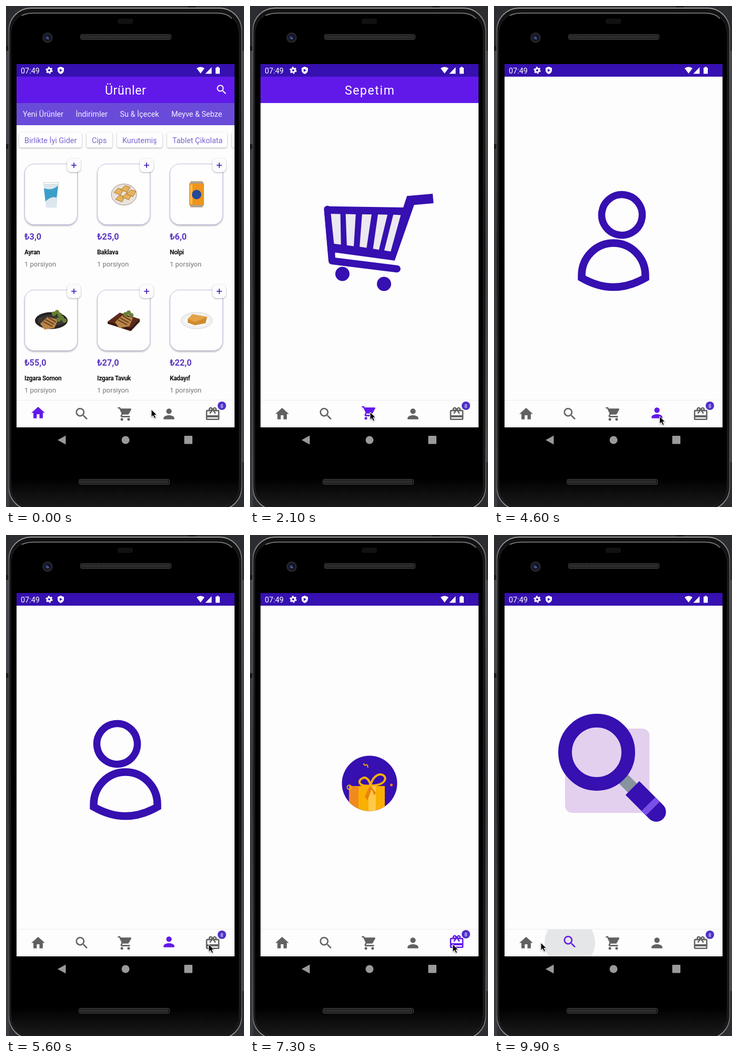
An HTML page for the animation above (10000 ms loop, 452 by 950 pixels).

```html
<!DOCTYPE html>
<html lang="tr">
<head>
<meta charset="utf-8">
<title>Market</title>
<style>
html, body { margin: 0; height: 100%; overflow: hidden; background: #2c2d31; }
svg { display: block; width: 452px; height: 950px; }
text { font-family: Roboto, Arial, sans-serif; font-size: 14.4px; white-space: pre; }
.title { font-size: 23px; fill: #fff; }
.price { font-size: 16.2px; font-weight: 700; fill: #5a35c4; }
.name { font-size: 12px; font-weight: 700; letter-spacing: -.35px; fill: #111; }
.unit { font-size: 13px; fill: #777; }
.soft { filter: drop-shadow(0 1px 1.5px #0005); }
.raised { filter: drop-shadow(0 2px 1.5px #0004); }
.ink { fill: #3610b0; }
.line { fill: none; stroke: #3610b0; }
</style>
</head>
<body>
<svg viewBox="0 0 452 950">
  <defs>
    <linearGradient id="rim" x2="0" y2="1">
      <stop offset="0" stop-color="#9a9a9a"/><stop offset=".05" stop-color="#5c5d60"/>
      <stop offset=".5" stop-color="#2c2d2f"/><stop offset=".95" stop-color="#55565a"/><stop offset="1" stop-color="#999"/>
    </linearGradient>
    <linearGradient id="body" x2="0" y2="1">
      <stop offset=".94" stop-color="#000"/><stop offset="1" stop-color="#1b1b1c"/>
    </linearGradient>
    <clipPath id="screen"><path d="M20 110h414v689H20z"/></clipPath>
    <clipPath id="bar"><path d="M20 748h414v51H20z"/></clipPath>
    <clipPath id="disc"><circle cx="227" cy="471" r="52.5"/></clipPath>
  </defs>

  <!-- Phone -->
  <path fill="#2c2d31" d="M0 0h452v950H0z"/>
  <path fill="#46484d" d="M0 85h6v177H0zM447 85h5v780h-5z"/>
  <path fill="#3a3c40" d="M0 271h6v679H0z"/>
  <path fill="#191a1c" d="M0 262h6v9H0zM0 76h6v9H0zM346 0h14v5h-14z"/>
  <rect x="5.500" y="4" width="442" height="951" rx="42" fill="#121213" stroke="url(#rim)" stroke-width="2"/>
  <rect x="9" y="13" width="434" height="938" rx="38" fill="url(#body)" stroke="#2a2b2d"/>
  <path d="M30 18Q40 13.500 54 13.500H400Q420 13.500 429 24" fill="none" stroke="#858585" stroke-width="1.500"/>
  <rect x="212" y="24" width="29" height="10" rx="4" fill="#111"/>
  <circle cx="79" cy="60" r="10" fill="#242426"/>
  <circle cx="79" cy="60" r="6.500" fill="#101326"/>
  <circle cx="78" cy="60" r="3" fill="#343d78"/>
  <circle cx="80" cy="62" r="1" fill="#aab4ee"/>
  <g fill="#161616" stroke="#4b4b4b">
    <rect x="141.500" y="54" width="172" height="9.500" rx="3"/>
    <rect x="138.500" y="897.500" width="172" height="9.500" rx="3"/>
    <path d="M144 58.700H311M141 902.300H308" stroke-width="6" stroke-dasharray="1 1.500"/>
  </g>
  <g fill="#9a9a9a">
    <path d="M98 823l15.500-8.500v17z"/><circle cx="227" cy="823" r="7.500"/>
    <rect x="338.500" y="815" width="15.500" height="15.500" rx="1"/>
  </g>

  <g clip-path="url(#screen)">
    <path fill="#fdfdfd" d="M20 110h414v689H20z"/>
    <g class="view" id="home"></g>

    <g class="view">
      <path fill="#6119ea" d="M20 134h414v50H20z"/>
      <text class="title" x="180" y="168" letter-spacing="1.6">Sepetim</text>
      <g id="basket">
        <path class="ink" d="M150 372L295 387 304 366H353V384H316L270 486 159 461 152 476 145 473V377Q145 372 150 372z"/>
        <path class="line" d="M151.500 378V476L273 502" stroke-width="13.500" stroke-linecap="round" stroke-linejoin="round"/>
        <path fill="#ebe8f0" d="M157 387l18 2-4 58-13-3zM185 390l19 2-9 60-13-3zM216 393l18 2-15 62-13-3zM246 396l18 2-22 65-11-3zM275 399l14 2-25 67-12-3z"/>
      </g>
      <g class="ink" id="wheels"><circle cx="163.500" cy="511" r="13.500"/><circle cx="242.500" cy="530" r="13.500"/></g>
      <path class="ink" id="sparks" d="M200 324q2-5 7-2l9 35q-3 4-6 1zM229 339q2-4 5-1l-6 17q-2 2-4 0zM252 338q5-3 7 2l-17 20q-4 3-6-1z"/>
    </g>

    <g class="view">
      <circle class="line" id="head" cx="227" cy="395" r="38.500" stroke-width="13.500"/>
      <path class="line" d="M166.500 515.500V511A60.500 61.500 0 0 1 287.500 511V515.500Q227 550.500 166.500 515.500z" stroke-width="14.500"/>
    </g>

    <g class="view">
      <circle class="ink" cx="227" cy="471" r="52.500"/>
      <g clip-path="url(#disc)"><g id="gift">
        <path fill="#f08a1d" d="M188 490h18v55h-18z"/>
        <path fill="#f9b000" d="M206 490h50v55h-50z"/>
        <path fill="#ffc84a" d="M225 490h14v55h-14z"/>
        <path fill="#e8820c" d="M228 488l-10 22 5 7 8-21 5 12 3-5z"/>
        <path fill="none" stroke="#f9b000" stroke-width="4" d="M229 489C206 492 203 480 214 475 222 471 228 482 229 489 232 474 243 465 252 469 262 474 257 489 229 489z"/>
        <g fill="none" stroke="#f9b000" stroke-width="2"><circle cx="188.500" cy="492.500" r="4"/><path d="M216 447q1 5 4 3t4 5"/></g>
        <circle cx="268.500" cy="488" r="2.500" fill="#f08a1d"/>
      </g></g>
      <g id="confetti"></g>
    </g>

    <g class="view">
      <rect x="135" y="367" width="160.500" height="160" rx="14" fill="#e3d0ef"/>
      <g id="lens"><g transform="translate(195 412) rotate(45)">
        <path fill="#87939f" d="M62-12h37v24H62z"/>
        <path class="ink" d="M96-18.500h64a18.500 18.500 0 0 1 0 37H96z"/>
        <path fill="#7a4fe8" d="M139-18.500h12v37h-12z"/>
        <circle r="60" fill="#e3d0ef" stroke="#3610b0" stroke-width="26"/>
      </g></g>
    </g>

    <!-- Status bar -->
    <path class="ink" d="M20 110h414v24H20z"/>
    <g fill="#fff">
      <text x="28" y="127.500" fill="#fff">07:49</text>
      <circle cx="82" cy="122" r="3.600" fill="none" stroke="#fff" stroke-width="3"/>
      <circle cx="82" cy="122" r="5.700" fill="none" stroke="#fff" stroke-width="2" stroke-dasharray="3 2.970"/>
      <path d="M104 115l6 2.500v4c0 3.500-2.500 6.500-6 7.500-3.500-1-6-4-6-7.500v-4z"/>
      <path class="ink" d="M102 119l5 3-5 3z"/>
      <path d="M362 118q7.500-5 15 0l-7.500 10zM378.500 128.500h12V116zM398 117h2v-1.500h4v1.500h2v11.500h-8z"/>
    </g>

    <!-- Navigation -->
    <path fill="#fdfdfd" d="M20 747h414v52H20z"/>
    <path d="M20 747.500h414" stroke="#ececec"/>
    <g clip-path="url(#bar)"><circle class="wave" cy="773" fill="#1c2228"/><circle class="wave" cy="773" fill="#222"/></g>
    <g id="nav"></g>
    <g id="badge">
      <circle cx="410" cy="758" r="8" fill="#5030c8"/>
      <text x="410" y="761.500" text-anchor="middle" fill="#fff" style="font-size:9.500px">8</text>
    </g>
  </g>
  <path class="soft" id="cursor" stroke="#fff" d="M0 0V14.500L3.400 11.500 6 17 8.600 15.800 6 10.500H10.500z"/>
</svg>

<script>
const $ = id => document.getElementById(id);
const all = s => [...document.querySelectorAll(s)];
const clamp = v => Math.min(1, Math.max(0, v));
const smooth = v => (v = clamp(v)) * v * (3 - 2 * v);
const set = (el, attrs) => { for (const k in attrs) el.setAttribute(k, attrs[k]); };
const oval = (rx, ry, style) => `<ellipse rx="${rx}" ry="${ry}" ${style}/>`;
const path = (d, style) => `<path d="${d}" ${style}/>`;
const fill = c => `fill="${c}"`;

// Eased interpolation between rows of [time, value, ...]
function track(t, rows) {
  let i = rows.findIndex(r => r[0] > t);
  if (i < 0) return rows.at(-1).slice(1);
  if (!i) return rows[0].slice(1);
  const a = rows[i - 1], b = rows[i], k = smooth((t - a[0]) / (b[0] - a[0]));
  return a.slice(1).map((v, j) => v + (b[j + 1] - v) * k);
}

const icons = {
  home: "M10 20v-6h4v6h5v-8h3L12 3 2 12h3v8z",
  search: "M15.5 14h-.79l-.28-.27A6.5 6.5 0 1 0 13.730 14.430l.27.28v.79l5 4.990L20.490 19zM9.500 14a4.500 4.500 0 1 1 0-9 4.500 4.500 0 0 1 0 9z",
  cart: "M7 18a2 2 0 1 0 0 4 2 2 0 0 0 0-4zM1 2v2h2l3.600 7.590-1.350 2.450A2 2 0 0 0 7 17h12v-2H7.420a.25.25 0 0 1-.22-.37l.9-1.630h7.450q1.200 0 1.750-1.030l3.580-6.490A1 1 0 0 0 20 4H5.210l-.94-2zM17 18a2 2 0 1 0 0 4 2 2 0 0 0 0-4z",
  person: "M12 12a4 4 0 1 0 0-8 4 4 0 0 0 0 8zm0 2c-2.670 0-8 1.340-8 4v2h16v-2c0-2.660-5.330-4-8-4z",
  gift: "M20 6h-2.180A3 3 0 0 0 12.500 3.350l-.5.67-.5-.68A3 3 0 0 0 6.180 6H4a2 2 0 0 0-2 2v11a2 2 0 0 0 2 2h16a2 2 0 0 0 2-2V8a2 2 0 0 0-2-2zM15 4a1 1 0 1 1 0 2 1 1 0 0 1 0-2zM9 4a1 1 0 1 1 0 2 1 1 0 0 1 0-2zM20 19H4v-2h16zM20 14H4V8h5.080L7 10.830 8.620 12 12 7.400 15.380 12 17 10.830 14.920 8H20z"
};
const navX = [61, 144, 226.5, 309.5, 392.5];
$("nav").innerHTML = Object.values(icons).map(d => path(d, "")).join("");
const navIcons = [...$("nav").children];

const plate = oval(24, 20, 'fill="#e9e2dc" stroke="#a08d80"');
const grill = (x, y) => path(`M${x} ${y}l14-13 20 5-7 16-19 3z`, fill("#b98347")) +
  path(`M${x + 6} ${y - 4}l17 9M${x + 10} ${y - 8}l16 9M${x + 15} ${y - 12}l15 9`, 'stroke="#5c341c" stroke-width="1.800"');
const greens = (x, y) => [[0, 0], [6, -3], [11, 2]].map(([a, b]) =>
  `<circle cx="${x + a}" cy="${y + b}" r="4.200" fill="#667f35"/>`).join("");
const foods = [
  path("M-15-22h29l-4 47h-20z", fill("#dbe7ec")) + path("M-14-12Q0-6 13-17L10 6Q0 2-11 13z", fill("#3b9fc9")) +
    path("M-15-23h29v4h-29z", 'fill="#f5f7f8" stroke="#ccd5d8"'),
  plate + [[-10, -6], [3, -11], [-7, 7], [6, 3], [14, -3]].map(([x, y]) =>
    path(`M${x - 9} ${y + 2}l8-8 10 3-6 10z`, 'fill="#e3b45b" stroke="#a9702c"')).join(""),
  path("M-11-25h22l3 5v39l-3 5h-22l-3-5v-39z", fill("#ee951c")) + path("M-11-25h22l2 4h-26zM-13 20h26l-2 4h-22z", fill("#a8a19b")) +
    path("M-12-19h4v37h-4z", fill("#ffbd50")) + '<circle r="9" fill="#24489a"/>',
  oval(31, 16, fill("#242321")) + oval(26, 11, fill("#3a3734")) + greens(5, -13) + grill(-21, 6) + greens(14, -2),
  path("M-31 2L-8-15 30-3 13 18z", fill("#5b2b1a")) + path("M-31 2L13 14 30-3v5L13 20-31 6z", fill("#35170f")) + greens(3, -12) + grill(-17, 3),
  oval(30, 15.5, 'fill="#f0f0f0" stroke="#d4d4d4"') + oval(23, 10, fill("#fafafa")) +
    path("M-17-3L-8-12 20-7 17 5-3 9-17 4z", fill("#cf8a2f")) + path("M-17-3L-8-12 20-7-3 3z", fill("#e3a347"))
];
const items = [["3,0", "Ayran"], ["25,0", "Baklava"], ["6,0", "Nolpi"],
  ["55,0", "Izgara Somon"], ["27,0", "Izgara Tavuk"], ["22,0", "Kadayıf"]];
const card = ([price, name], i) => `<g transform="translate(${35 + i % 3 * 138} ${299 + (i > 2) * 239})">
  <rect class="raised" x=".5" y=".5" width="100" height="115" rx="18" fill="#fefefe" stroke="#c3b7e4"/>
  <g transform="translate(51 58.5)">${foods[i]}</g>
  <rect class="soft" x="81" y="-10" width="26" height="26" rx="8" fill="#fcfcfe"/>
  <path d="M94-2v10M89 3h10" stroke="#3610b0" stroke-width="1.6"/>
  <text class="price" y="143.500">₺${price}</text><text class="name" y="172">${name}</text>
  <text class="unit" y="194.500">1 porsiyon</text></g>`;
const tabs = [[32, "Yeni Ürünler"], [132.5, "İndirimler"], [216.5, "Su & İçecek"], [314, "Meyve & Sebze"]];
const chips = [[25, 119, "Birlikte İyi Gider"], [153, 49, "Cips"], [211, 86, "Kurutemiş"], [306, 114, "Tablet Çikolata"], [429, 60, ""]];
$("home").innerHTML = path("M20 134h414v50H20z", fill("#6119ea")) + path("M20 184h414v42H20z", fill("#6a4bd9")) +
  '<text class="title" x="188" y="168" letter-spacing=".7">Ürünler</text>' +
  path(icons.search, 'fill="#fff" transform="translate(397.5 146.500)"') +
  tabs.map(([x, s]) => `<text x="${x}" y="210" fill="#f4f1ff">${s.replace("&", "&amp;")}</text>`).join("") +
  chips.map(([x, w, s]) => `<rect class="soft" x="${x}" y="240" width="${w}" height="28.500" rx="4" fill="#fefefe"/>
    <text x="${x + 10}" y="259.500" fill="#7c64cf">${s}</text>`).join("") + items.map(card).join("");

// x, y, size, colour, turn of each paper piece after the burst
const colours = ["#3610b0", "#9038f0", "#f5b52c"];
const pieces = [[318, 382, 11, 0, 105], [281, 411, 11, 0, 40], [157, 414, 11, 0, 110], [144, 425, 4, 0, 0],
  [167, 454, 10, 0, 10], [304, 426, 4, 0, 20], [194, 394, 12, 1, 0], [240, 382, 12, 1, -20], [305, 466, 12, 1, 15],
  [162, 373, 4, 2, 0], [160, 393, 4, 2, 0]];
$("confetti").innerHTML = pieces.map(p => path("M-.55-.25L.55-.32 .35.3-.25.32z", fill(colours[p[3]]))).join("");
const papers = [...$("confetti").children];

// Start time, view, navigation item
const visits = [[-1000, 0, 0], [1000, 1, 2], [3400, 2, 3], [5700, 3, 4], [9500, 4, 1]];
const pointer = [[0, 276, 765], [900, 228, 770], [2300, 228, 770], [3200, 315, 778], [4500, 315, 778], [4700, 314, 778],
  [5500, 385, 776], [7600, 385, 776], [8700, 108, 775], [9350, 140, 774], [9550, 140, 774], [9900, 89, 773]];
const views = all(".view"), waves = all(".wave");

function drawGift(p) {
  const [y] = track(p, [[200, 90], [500, 0], [800, -14], [2400, -14], [2800, 90]]);
  set($("gift"), { transform: `translate(0 ${y})` });
  const k = smooth((p - 50) / 450), late = clamp((p - 500) / 1100);
  set($("confetti"), { opacity: p < 50 ? 0 : clamp((1600 - p) / 600) });
  papers.forEach((el, i) => {
    const [x, y, size, , turn] = pieces[i];
    set(el, { transform: `translate(${231 + (x - 231) * k} ${464 + (y - 464) * k + 30 * late * late})
      rotate(${turn + 180 * (k - 1) + 120 * late}) scale(${size * (.85 + .25 * k)})` });
  });
}

function draw(t) {
  const n = visits.findLastIndex(v => v[0] <= t), [start, view, tab] = visits[n], age = t - start;
  views.forEach((el, i) => set(el, { opacity:
    i === view ? clamp((age - 100) / 200) : i === view - 1 ? clamp(1 - (age / 300) ** 2) : 0 }));

  const rock = (1 + Math.cos((t - 3500) / 2800 * 6 * Math.PI)) / 2;
  set($("basket"), { transform: `rotate(${5 * (rock - 1)} 236 430)` });
  set($("wheels"), { transform: `translate(${12 * (1 - rock)} ${-3 * (1 - rock)})` });
  set($("sparks"), { opacity: clamp(rock * 4 - 2.5) });
  set($("head"), { transform: `rotate(${8 * Math.cos((t - 4600) / 1000 * Math.PI)} 227 510)` });
  drawGift(Math.max(0, t - 5700) % 2900);
  const a = (t - 9900) / 1000 * Math.PI;
  set($("lens"), { transform: `translate(${14 * Math.sin(a)} ${14 * (1 - Math.cos(a))})` });

  const lift = 2 * clamp((age - 100) / 100);
  navIcons.forEach((el, i) => set(el, { fill: i === tab ? "#6119ea" : "#616161",
    transform: `translate(${navX[i]} ${773.5 - (i === tab) * lift}) scale(1.28) translate(-12 -12)` }));
  set($("badge"), { transform: `translate(0 ${tab === 4 ? -lift / 2 : 0})` });
  const fade = clamp((700 - age) / 200);
  set(waves[0], { cx: navX[tab], r: 48 * clamp((age - 100) / 200), opacity: .1 * fade });
  set(waves[1], { cx: navX[tab], r: 39 * clamp((age - 400) / 100), opacity: .05 * fade });
  const [x, y] = track(t, pointer);
  set($("cursor"), { transform: `translate(${x} ${y})` });
}

const begin = performance.now();
function tick() {
  draw(Math.floor((performance.now() - begin) % 10000 / 100) * 100);
  requestAnimationFrame(tick);
}
tick();
</script>
</body>
</html>
```
